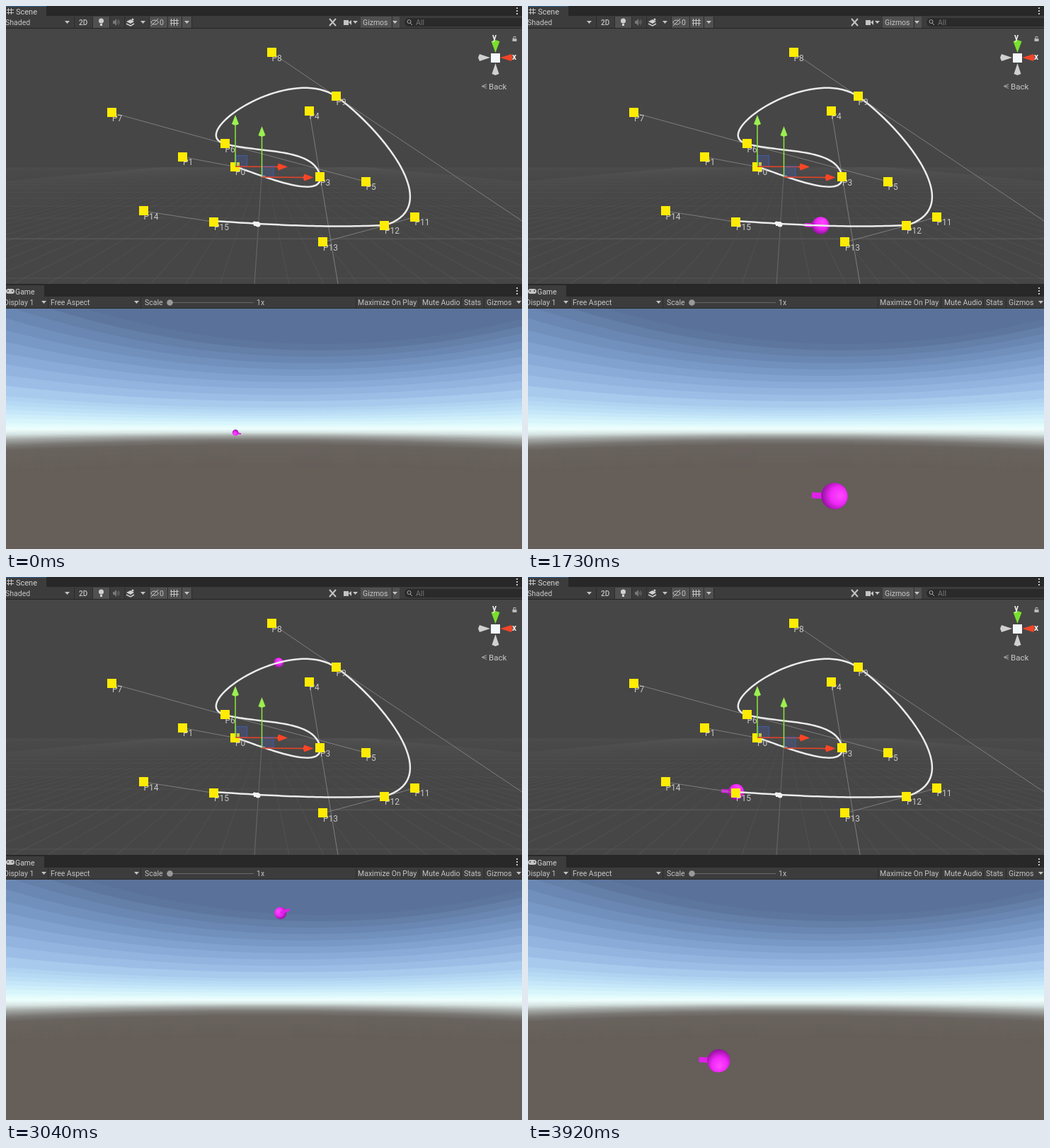
These frames come from a looping animation (729 px wide and 768 px high, 4030 ms). An HTML page with a canvas:

```html
<!DOCTYPE html>
<html>
<head>
<meta charset="utf-8">
<style>
  html, body { margin: 0; width: 100%; height: 100%; overflow: hidden; background: #282828; }
  canvas { display: block; width: 729px; height: 768px; }
</style>
</head>
<body>
<canvas id="stage" width="729" height="768"></canvas>
<script>
const W = 729, H = 768, LOOP = 4030, STEP = 108.9, SECOND_PASS = 2000;
const stage = document.getElementById('stage').getContext('2d');
let ctx = stage;

const linear = u => u, slowDown = u => Math.sin(u * Math.PI / 2);

// Each segment: end time, Bezier points, ball radii along it, arm reach, pace
const segments = [
  { end: 380, points: [[324, 227.5], [343, 232], [446, 278], [444, 242]], radii: [4, 4, 5.5, 6.3], reach: 2, pace: linear },
  { end: 780, points: [[444, 242], [437, 200], [361, 208.5], [309.5, 195]], radii: [6.3, 6.2, 5.6, 5.5], reach: 2, pace: linear },
  { end: 1165, points: [[309.5, 195], [253, 180], [399, 82], [466.5, 128]], radii: [5.5, 5, 6.5, 8.8], reach: 2, pace: linear },
  { end: 1555, points: [[466.5, 128], [517, 163], [628, 283], [535, 310]], radii: [8.8, 18, 17, 14.2], reach: 1.4, pace: slowDown },
  { end: 1905, points: [[535, 310], [455, 314], [375, 309.5], [294, 304]], radii: [14.2, 13, 11.4, 11.2], reach: 1.9, pace: linear }
];

const handles = {
  P1: [250, 213.5], P0: [324, 227.5], P3: [444, 242], P4: [428.5, 148.5], P5: [508.5, 248.5],
  P6: [309.5, 195], P7: [150, 151], P8: [375.5, 66], P9: [466.5, 128], P11: [577.5, 298.5],
  P12: [535, 310.5], P13: [448, 334], P14: [194.5, 290], P15: [294, 305.5]
};

function rect(x, y, w, h, color) { ctx.fillStyle = color; ctx.fillRect(x, y, w, h); }

function line(points, color, width = 1) {
  ctx.beginPath();
  points.forEach(p => ctx.lineTo(p[0], p[1]));
  ctx.strokeStyle = color;
  ctx.lineWidth = width;
  ctx.stroke();
}

function shape(points, color) {
  ctx.beginPath();
  points.forEach(p => ctx.lineTo(p[0], p[1]));
  ctx.fillStyle = color;
  ctx.fill();
}

function disc(x, y, r, color) {
  ctx.beginPath();
  ctx.arc(x, y, r, 0, 7);
  ctx.fillStyle = color;
  ctx.fill();
}

function text(str, x, y, color = '#c4c4c4', font = '10.5px') {
  ctx.font = font + ' Roboto, sans-serif';
  ctx.fillStyle = color;
  ctx.fillText(str, x, y);
}

const dropArrow = (x, y) => shape([[x - 3, y - 2], [x + 4, y - 2], [x + .5, y + 2]], '#c4c4c4');
const menuDots = (x, y) => [-4, 0, 4].forEach(d => rect(x, y + d, 2, 2, '#c4c4c4'));

// Cone with its tip at (x, y), opening towards the unit vector (dx, dy)
function cone(x, y, dx, dy, length, half, color) {
  const bx = x + dx * length, by = y + dy * length;
  shape([[x, y], [bx - dy * half, by + dx * half], [bx + dx * 2, by + dy * 2], [bx + dy * half, by - dx * half]], color);
}

// ---- static background ----
function drawGrid() {
  rect(0, 32, W, 362, '#464646');
  const fade = ctx.createLinearGradient(0, 228, 0, 393);
  fade.addColorStop(0, 'rgba(130,130,130,.08)');
  fade.addColorStop(1, 'rgba(130,130,130,.28)');
  ctx.save();
  ctx.beginPath();
  ctx.rect(0, 228, W, 166);
  ctx.clip();
  for (let i = -40; i <= 40; i++) line([[363.5, 215], [351 + i * 49, 394]], fade, .7);
  for (let i = 2; i < 26; i++) { const y = 215 + 340 / i; line([[0, y], [W, y]], fade, .7); }
  line([[361, 242], [351, 394]], '#666', 1);
  line([[0, 329.5], [W, 329.5]], '#585858', 1);
  ctx.restore();
}

const skyStops = [[478, 90, 114, 153], [500, 106, 135, 178], [520, 121, 153, 199], [540, 141, 174, 218],
  [555, 157, 190, 230], [570, 176, 211, 241], [582, 197, 231, 249], [591, 218, 247, 252], [598, 238, 255, 253],
  [603, 214, 228, 226], [608, 164, 168, 165], [614, 121, 119, 116], [621, 105, 99, 94], [650, 101, 94, 89]];

function skyColor(v) {
  let i = 0;
  while (i < skyStops.length - 2 && v > skyStops[i + 1][0]) i++;
  const a = skyStops[i], b = skyStops[i + 1];
  const m = Math.max(0, Math.min(1, (v - a[0]) / (b[0] - a[0])));
  return `rgb(${[1, 2, 3].map(c => Math.round(a[c] + (b[c] - a[c]) * m))})`;
}

function drawSky() {
  ctx.save();
  ctx.beginPath();
  ctx.rect(0, 428, W, 340);
  ctx.clip();
  rect(0, 428, W, 340, skyColor(470));
  for (let v = 478, band; v < 652; v += band) {
    band = v < 568 ? 9 : v < 592 ? 4 : 1;
    const sag = Math.max(-10, (597 - v) * .6), middle = 364 + Math.max(0, 597 - v) * .7;
    const edge = [];
    for (let x = 0; x <= W + 9; x += 9) edge.push([x, v - sag * ((x - middle) / 400) ** 2]);
    shape([...edge, [W + 9, H], [0, H]], skyColor(v + band / 2));
  }
  ctx.restore();
}

function drawSceneBars() {
  rect(0, 0, W, 14, '#282828');
  rect(0, 0, 57, 14, '#3c3c3c');
  rect(0, 0, 57, 1, '#2c5d87');
  rect(0, 14, W, 17, '#3c3c3c');
  rect(0, 31, W, 1, '#232323');
  [4, 8].forEach(x => line([[x - .5, 3], [x - .5, 12]], '#c4c4c4'));
  [5, 9].forEach(y => line([[1, y + .5], [11, y + .5]], '#c4c4c4'));
  text('Scene', 14, 12, '#d2d2d2', '11px');
  menuDots(721, 6);
  text('Shaded', -1, 27);
  dropArrow(86, 23);
  rect(123, 15, 23, 16, '#505050');
  rect(202, 15, 60, 16, '#505050');
  rect(501, 15, 55, 16, '#505050');
  [96, 122, 146, 167, 202, 228, 248, 262, 545].forEach(x => rect(x, 15, 1, 16, '#2c2c2c'));
  text('2D', 103, 27, '#c4c4c4', '500 10px');
  disc(134.5, 21, 3.5, '#d0d0d0');
  rect(133, 25, 3, 3, '#d0d0d0');
  shape([[151, 21], [153, 21], [156, 18], [156, 28], [153, 25], [151, 25]], '#777');
  [3, 5].forEach(r => { ctx.beginPath(); ctx.arc(155, 23, r, -.8, .8); ctx.strokeStyle = '#777'; ctx.lineWidth = 1; ctx.stroke(); });
  shape([[170, 22], [176, 19], [181, 22], [176, 25]], '#d0d0d0');
  line([[170, 25], [176, 28], [181, 25]], '#d0d0d0', 1.5);
  disc(179, 19, 1.5, '#d0d0d0');
  dropArrow(193, 23);
  ctx.beginPath();
  ctx.ellipse(210, 23, 5, 3, 0, 0, 7);
  ctx.strokeStyle = '#c4c4c4';
  ctx.lineWidth = 1;
  ctx.stroke();
  line([[205, 28], [215, 18]], '#c4c4c4');
  text('0', 217, 27);
  [234, 238, 242].forEach(x => line([[x - .5, 18], [x - .5, 28]], '#c4c4c4'));
  [20, 24].forEach(y => line([[232, y + .5], [244, y + .5]], '#c4c4c4'));
  dropArrow(255, 23);
  line([[457, 18], [466, 28]], '#c4c4c4', 2);
  line([[466, 18], [457, 28]], '#c4c4c4', 2);
  rect(477, 20, 7, 7, '#c4c4c4');
  shape([[484, 23], [488, 20], [488, 27]], '#c4c4c4');
  dropArrow(493, 23);
  text('Gizmos', 504, 27);
  dropArrow(549, 23);
  ctx.beginPath();
  ctx.roundRect(563, 17, 180, 12, 6);
  ctx.fillStyle = '#2a2a2a';
  ctx.fill();
  ctx.beginPath();
  ctx.arc(569.5, 22, 2.5, 0, 7);
  ctx.strokeStyle = '#aaa';
  ctx.lineWidth = 1;
  ctx.stroke();
  line([[571, 24], [574, 27]], '#aaa');
  text('All', 579, 27, '#777');
}

function drawGameBars() {
  rect(0, 393, W, 18, '#282828');
  rect(0, 395, 54, 16, '#3c3c3c');
  rect(0, 411, W, 17, '#3c3c3c');
  rect(0, 427, W, 1, '#2a2a2a');
  ctx.beginPath();
  ctx.roundRect(0, 400, 12, 7, 3.5);
  ctx.fillStyle = '#c4c4c4';
  ctx.fill();
  disc(3, 403, 1, '#3c3c3c');
  disc(9, 403, 1, '#3c3c3c');
  text('Game', 13, 408, '#d2d2d2');
  menuDots(721, 402);
  text('Display 1', -3, 423);
  dropArrow(53, 419);
  text('Free Aspect', 63, 423);
  dropArrow(184, 419);
  text('Scale', 196, 423);
  rect(231, 419, 119, 1, '#686868');
  disc(231.5, 419.5, 4.3, '#999');
  text('1x', 354, 423);
  [59, 190, 494, 583, 643, 675].forEach(x => rect(x, 412, 1, 15, '#2c2c2c'));
  text('Maximize On Play', 497, 423);
  text('Mute Audio', 588, 423);
  text('Stats', 647, 423);
  text('Gizmos', 679, 423);
  dropArrow(724, 419);
}

// ---- ball ----
function place(seg, u) {
  const v = 1 - u, basis = [v * v * v, 3 * v * v * u, 3 * v * u * u, u * u * u];
  const mix = values => basis.reduce((sum, b, i) => sum + b * values[i], 0);
  return { x: mix(seg.points.map(p => p[0])), y: mix(seg.points.map(p => p[1])), r: mix(seg.radii) };
}

const CX = 364.5, CY = 212, FOCAL = 313;
const toSpace = p => [(p.x - CX) / p.r, (p.y - CY) / p.r, FOCAL / p.r];
const toScreen = ([x, y, z]) => ({ x: CX + x * FOCAL / z, y: CY + y * FOCAL / z, r: FOCAL / z });

function ballAt(time) {
  const t = time < SECOND_PASS ? time : time - SECOND_PASS;
  let i = 0;
  while (i < 4 && t >= segments[i].end) i++;
  const seg = segments[i], start = i ? segments[i - 1].end : 0;
  const u = seg.pace(Math.min(1, (t - start) / (seg.end - start)));
  const ball = place(seg, u), before = toSpace(place(seg, u - .01)), after = toSpace(place(seg, u + .01));
  const move = after.map((a, k) => a - before[k]), speed = Math.hypot(...move);
  const tip = toScreen(toSpace(ball).map((c, k) => c + seg.reach * move[k] / speed));
  return { ball, tip };
}

function gameView(p) {
  const k = .8 + .049 * p.r;
  return { x: CX + k * (p.x - CX), y: 598 + k * (p.y - CY - 2.5 * p.r), r: 1.1 * k * p.r };
}

function drawBall(ball, tip, squash) {
  const dx = tip.x - ball.x, dy = tip.y - ball.y;
  const arm = () => line([[ball.x, ball.y], [tip.x, tip.y]], Math.abs(dy) > Math.abs(dx) ? '#9414a0' : '#df20e8', ball.r * .45);
  const towardsViewer = tip.r > ball.r * 1.03;
  if (!towardsViewer) arm();
  ctx.save();
  ctx.translate(ball.x, ball.y);
  if (squash > 1) ctx.rotate(Math.atan2(ball.y - 598, ball.x - CX));
  ctx.scale(ball.r, ball.r / squash);
  const shade = ctx.createRadialGradient(.25, -.4, .1, .1, -.2, 1.25);
  shade.addColorStop(0, '#ff45ff');
  shade.addColorStop(.5, '#ee27f6');
  shade.addColorStop(1, '#8b1195');
  disc(0, 0, 1, shade);
  ctx.restore();
  if (towardsViewer && Math.hypot(dx, dy) > ball.r) arm();
}

// ---- scene overlays ----
function moveGizmo(x, y, rise, run) {
  ctx.fillStyle = 'rgba(70,95,190,.25)';
  ctx.fillRect(x + 1, y - 16, 16, 16);
  ctx.strokeStyle = '#3f5ba8';
  ctx.lineWidth = 1;
  ctx.strokeRect(x + 1.5, y - 15.5, 15, 15);
  line([[x, y], [x, y - rise + 12]], '#8bea3a', 1.5);
  line([[x, y], [x + run - 12, y + .5]], '#ea4226', 1.5);
  cone(x, y - rise, 0, 1, 13, 5, '#9bf04e');
  cone(x + run, y + .5, -1, 0, 13, 5, '#fa4526');
}

function drawOverlays() {
  const h = handles;
  [[h.P1, h.P0], [h.P4, h.P3, [469, 393]], [h.P7, h.P6, h.P5], [h.P8, h.P9, [729, 304]],
    [h.P11, h.P12, h.P13], [h.P14, h.P15]].forEach(l => line(l, '#8c8c8c', .8));
  const path = [];
  segments.forEach(seg => {
    for (let i = 0; i <= 40; i++) { const p = place(seg, i / 40); path.push([p.x, p.y]); }
  });
  line(path, '#ebebeb', 2.5);
  for (const name in h) {
    const [x, y] = h[name];
    text(name, x, y + 11.5, '#c8c8c8', '12px');
    rect(Math.floor(x - 6.5), Math.floor(y - 6.5), 13, 13, '#ffeb04');
  }
  moveGizmo(324, 227, 73, 74);
  moveGizmo(361.5, 242, 72, 73);
  rect(350, 305, 7, 6, '#f2f2f2');
  disc(351, 307, 2.5, '#f2f2f2');
  disc(356, 309, 3.5, '#f2f2f2');

  cone(691.5, 66, 0, -1, 16, 6, '#7ae02c');
  cone(698, 73, 1, 0, 16, 5, '#f04528');
  cone(684, 73, -1, 0, 15, 5, '#d0d0d0');
  cone(691.5, 81, 0, 1, 15, 5, '#d0d0d0');
  rect(685, 67, 13, 13, '#f4f8fa');
  text('y', 687, 48, '#eee', 'bold 12px');
  text('x', 715, 76, '#eee', 'bold 12px');
  text('Back', 682, 118, '#c8c8c8', '11.5px');
  line([[679, 110.5], [672, 113.5], [679, 116.5]], '#aaa');
  line([[672, 113.5], [679, 113.5]], '#999');
  rect(715.5, 46, 6, 4, '#bbb');
  line([[717, 46], [717, 43.5], [720, 43.5], [720, 45]], '#bbb');
}

const backdrop = document.createElement('canvas');
backdrop.width = W;
backdrop.height = H;
ctx = backdrop.getContext('2d');
drawGrid();
drawSky();
drawSceneBars();
drawGameBars();
ctx = stage;

function frame() {
  const t = performance.now() % LOOP;
  const tick = Math.min(36, Math.floor((t + 17) / STEP));
  const { ball, tip } = ballAt(Math.max(0, tick * STEP - 10));
  ctx.drawImage(backdrop, 0, 0);
  drawBall(ball, tip, 1);
  drawOverlays();
  const gameBall = gameView(ball);
  drawBall(gameBall, gameView(tip), 1 + ((gameBall.x - CX) / 480) ** 2);
  requestAnimationFrame(frame);
}
frame();
</script>
</body>
</html>
```
